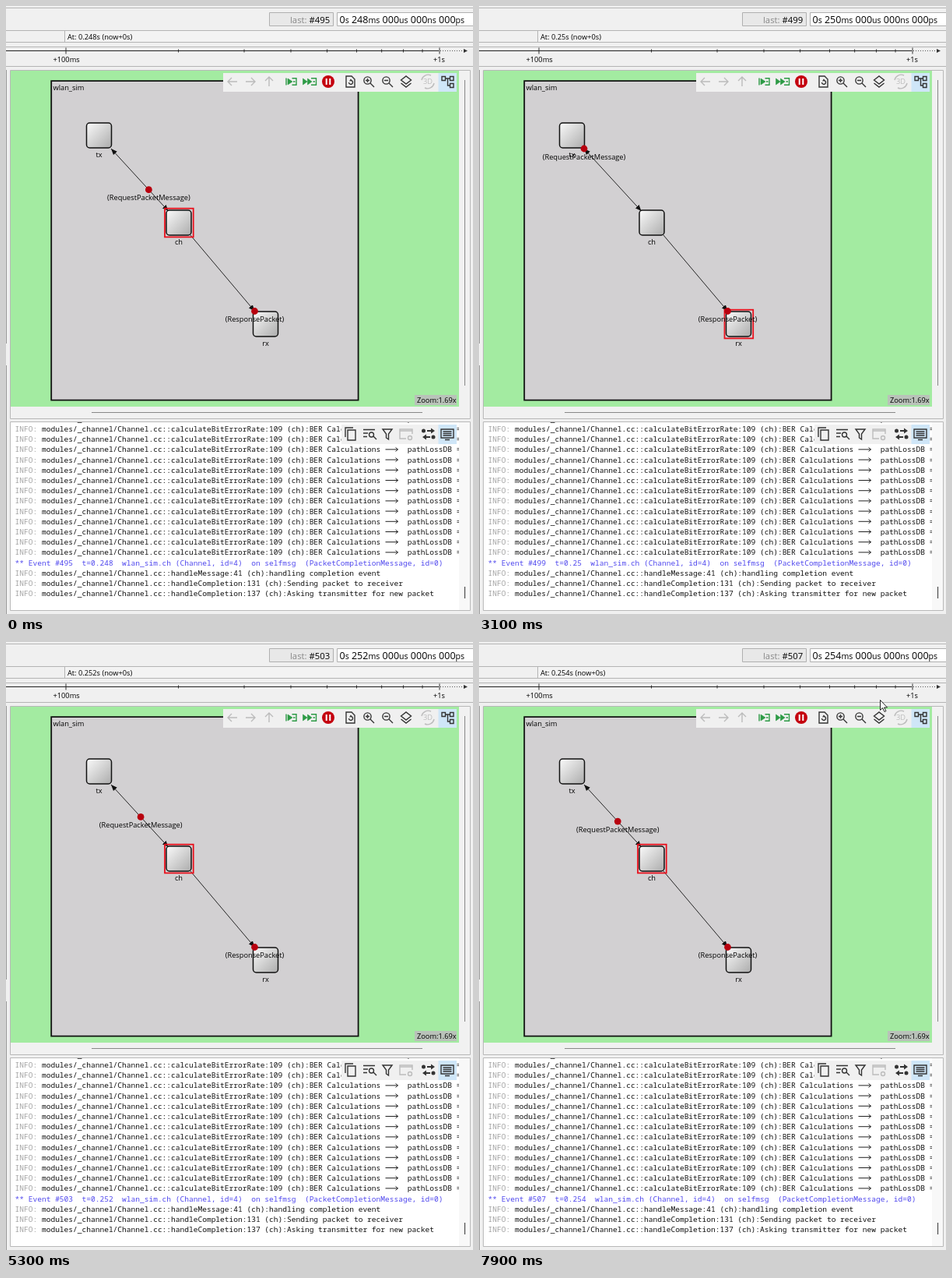
Animation, 600 px wide and 780 px high, one loop 8 s. Source, as an HTML page:

```html
<!DOCTYPE html>
<html lang="en">
<head>
<meta charset="utf-8">
<title>Network simulation</title>
<style>
html, body { margin: 0; width: 100%; height: 100%; overflow: hidden; background: #f0f0f0; }
svg { display: block; }
text { font: 9.25px "Open Sans", "Noto Sans", sans-serif; fill: #000; white-space: pre; }
.log text { font: 9.56px "Noto Sans Mono", "DejaVu Sans Mono", monospace; font-weight: 500; fill: #111; }
.log .info { fill: #a4a4a4; font-weight: 400; }
.log .event { fill: #5048ee; }
.last { font-size: 11.3px; }
.last tspan { fill: #888; }
.clock { font-size: 12.5px; }
.clock tspan { font-size: 10.6px; }
.mid { text-anchor: middle; }
.icon { fill: none; stroke: #333; stroke-width: 1.4; }
.off { stroke: #bcbcbc; }
</style>
</head>
<body>
<svg width="600" height="780" viewBox="0 0 600 780">
  <defs>
    <linearGradient id="metal" x2="1" y2="1">
      <stop stop-color="#fafafa"/><stop offset="1" stop-color="#acacac"/>
    </linearGradient>
    <marker id="tip" markerUnits="userSpaceOnUse" markerWidth="9" markerHeight="8" refX="8" refY="4" orient="auto-start-reverse">
      <path d="M0 .7L8 4L0 7.3z" fill="#111"/>
    </marker>
    <clipPath id="logClip"><path d="M6 534H582V775H6z"/></clipPath>
  </defs>

  <!-- status rows and timeline -->
  <path d="M0 2.5H600M0 31.5H600M0 46.5H600M75.5 31V46M0 52.5H600M0 77.5H600" stroke="#b4b4b4" fill="none"/>
  <path d="M76 32H600V46H76z" fill="#f3f3f3"/>
  <path d="M338.5 8.5H420.5V25.5H338.5z" fill="#e8e8e8" stroke="#b0b0b0"/>
  <path d="M425.5 8.5H602V25.5H425.5z" fill="#fff" stroke="#b0b0b0"/>
  <path id="ticks" fill="none" stroke="#333"/>
  <path d="M0 57.5H556" stroke="#222"/>
  <path d="M558 57.5H588" stroke="#555" stroke-dasharray="1 2"/>
  <path d="M588 55L593 57.5L588 60z" fill="#333"/>
  <text x="60.5" y="71.7">+100ms</text><text x="549" y="71.7">+1s</text>

  <!-- network canvas -->
  <path d="M0.5 82V433M0.5 461V780" stroke="#999"/>
  <path d="M5.5 82.5H596.5V529.5H5.5z" fill="#f1f1f1" stroke="#b8b8b8"/>
  <path d="M6 83H582V514H6z" fill="#a3eba1"/>
  <path d="M58.2 96.2H452.6V505.6H58.2z" fill="#d2d0d2" stroke="#111" stroke-width="1.8"/>
  <path d="M589.5 95V487M110 521.5H535" stroke="#888"/>
  <text x="60.5" y="108">wlan_sim</text>
  <path d="M525 499H579V512H525z" fill="#b9c2b9"/>
  <text x="528" y="508.700">Zoom:1.69x</text>
  <g id="net"></g>
  <g id="live"></g>

  <!-- canvas toolbar -->
  <path d="M279 86H579V110H279z" fill="#f0f0f0"/>
  <path d="M555.5 86H579V110H555.5z" fill="#cfe6f8"/>
  <g class="icon">
    <path class="off" d="M297 97H285m5-5l-5 5l5 5M308 97h12m-5-5l5 5l-5 5M338 103V91m-5 5l5-5l5 5"/>
    <g stroke="#2c9a45">
      <path d="M360 92.500V101.500M367.500 92.700h5.500v8.600h-5.500M369 97h2.500M392 92.700h6.500v8.600H392M394.500 97h2.500"/>
      <path d="M362 93L368 97L362 101zM381.500 93L387 97L381.500 101zM387.500 93L393 97L387.500 101z" fill="#2c9a45" stroke-width=".6"/>
    </g>
    <path d="M437 90h7l4 4v10h-11zM440.500 98a2.500 2.500 0 1 0 2-2.500l1-1.500"/>
    <circle cx="464.500" cy="95.500" r="4.600"/><path d="M468 99l5 5M462 95.500h5M464.500 93v5"/>
    <circle cx="488.500" cy="95.500" r="4.600"/><path d="M492 99l5 5M486 95.500h5"/>
    <path d="M507.500 95L514 90L520.500 95L514 100zM507.500 99L514 104L520.500 99"/>
    <path class="off" d="M534 95a8.500 8.500 0 0 1 12-6M550 99a8.500 8.500 0 0 1-12 6"/>
    <path d="M560 90.500h4.500v5H560zM570.500 90.500H575v5h-4.500zM570.500 99.500H575v5h-4.500zM564.500 93h6M567.500 93v9h3"/>
  </g>
  <text class="mid" x="542" y="100" style="fill:#bcbcbc">3D</text>
  <circle cx="414" cy="97" r="8" fill="#c4000f"/>
  <path d="M411.700 93V101M416.300 93V101" stroke="#fff" stroke-width="2"/>

  <!-- log -->
  <path d="M5.5 533.5H596.5V775.5H5.5z" fill="#fff" stroke="#b8b8b8"/>
  <path d="M582 534H596V775H582z" fill="#f8f8f8"/>
  <path d="M589.5 745V760" stroke="#555" stroke-width="1.300"/>
  <g id="log" class="log" clip-path="url(#logClip)"></g>
  <path d="M431 537H579V562H431z" fill="#f0f0f0"/>
  <path d="M555.5 537H579V562H555.5z" fill="#cfe6f8"/>
  <g class="icon">
    <path d="M439 544h10v13h-10zM436 553V541h10"/>
    <path d="M459 543.500h15M459 548h6M459 552.500h5M472 552l4 4"/><circle cx="469.500" cy="550" r="3"/>
    <path d="M484 543h12l-4.500 6v7l-3-2v-5z"/>
    <path class="off" d="M514 555h-8V543h16v6M506 545h16"/><circle class="off" cx="519" cy="554" r="2.500"/>
    <path d="M559 543h16v11h-16zM561.500 546h11M561.500 548.500h11M561.500 551h11M564 556.500h6"/>
    <g fill="#333" stroke="none">
      <circle cx="536.500" cy="545" r="2.500"/><circle cx="549" cy="553" r="2.500"/>
      <path d="M541 544h5v-2.500l5 3.500l-5 3.500V546h-5zM545 552h-5v-2.500l-5 3.500l5 3.500V554h5z"/>
    </g>
  </g>
  <path id="cursor" d="M0 0V13L3 10L5.500 15L7.500 14L5 9.500H9z" fill="#fff" stroke="#222"/>
</svg>
<script>
const $ = id => document.getElementById(id);
const LOOP = 8000;
const STARTS = [0, 2608, 5216, 7858];
const ROWS = 18, PITCH = 13.2, LAST_ROW = 757.2, LOG_X = 11.6;
const NODES = { tx: [119.5, 166], ch: [222, 278], rx: [333.5, 408] };
const TX_END = [135, 183], CH_END = [208.5, 263], CH_OUT = [237, 294], RX_END = [319.5, 391.5];
// Moments within one cycle of four events, in ms
const SENT = 396, RX_EVENT = 600, TX_NEXT = 780, TX_EVENT = 954, BACK = 1554,
      CH_EVENT = 1650, COMPUTED = 1740, COMPLETED = 1830, REQUEST = 2404, PERIOD = 2608;

const text = (x, y, s, attrs = "") => `<text x="${x}" y="${y}" ${attrs}>${s}</text>`;
const progress = (u, from, to) => Math.min(1, Math.max(0, (u - from) / (to - from)));
const mix = (a, b, p) => a.map((v, i) => v + (b[i] - v) * p);

$("ticks").setAttribute("d", [1, 2, 3, 4, 5, 6, 7, 8, 9, 10].map(k => {
  const size = k % 9 === 1 ? 4 : 2;
  return `M${77 + 480 * Math.log10(k)} ${57.5 - size}v${2 * size}`;
}).join(""));

const wire = (a, b, attrs) =>
  `<path d="M${a}L${b}" stroke="#111" stroke-width=".9" marker-end="url(#tip)" ${attrs}/>`;
$("net").innerHTML = wire(TX_END, CH_END, 'marker-start="url(#tip)"') + wire(CH_OUT, RX_END, "") +
  Object.entries(NODES).map(([name, [x, y]]) =>
    `<rect x="${x - 16}" y="${y - 16}" width="32" height="32" rx="4" fill="url(#metal)" stroke="#111" stroke-width="1.5"/>` +
    text(x, y + 28, name, 'class="mid"')).join("");

const message = ([x, y], name) =>
  `<circle cx="${x}" cy="${y}" r="4.4" fill="#b8000f"/>` + text(x, y + 13.5, `(${name})`, 'class="mid"');

function logLines(cycle, u) {
  const time = +(0.248 + 0.002 * cycle).toFixed(3);
  const first = 495 + 4 * cycle, id = 248 + 2 * cycle;
  const event = (n, target, cause) => `** Event #${first + n}  t=${time}  wlan_sim.${target}  on ${cause}`;
  const channel = s => `INFO: modules/_channel/Channel.cc::${s}`;
  const ber = Array(ROWS).fill(channel("calculateBitErrorRate:109 (ch):BER Calculations --&gt;  pathLossDB ="));
  if (u >= COMPUTED) return ber;
  const lines = [...ber,
    event(0, "ch (Channel, id=4)", "selfmsg  (PacketCompletionMessage, id=0)"),
    channel("handleMessage:41 (ch):handling completion event"),
    channel("handleCompletion:131 (ch):Sending packet to receiver"),
    channel("handleCompletion:137 (ch):Asking transmitter for new packet")];
  if (u >= RX_EVENT) lines.push(
    event(1, "rx (Receiver, id=3)", ` (ResponsePacket, id=${id})`),
    `INFO: modules/receiver/Receiver.cc::handleMessage:16 (rx):got valid message, sequenceNumber = ${123 + cycle}, last`);
  if (u >= TX_EVENT) lines.push(
    event(2, "tx (Transmitter, id=2)", ` (RequestPacketMessage, id=${id + 1})`),
    `INFO: modules/transmitter/Transmitter.cc::handleMessage:17 (tx):generating a new packet at time ${time}`);
  if (u >= CH_EVENT) lines.push(event(3, "ch (Channel, id=4)", ` (ResponsePacket, id=${id + 2})`));
  return lines.slice(-ROWS);
}

function logRow(line, i) {
  const y = LAST_ROW - PITCH * (ROWS - 1 - i);
  if (line[0] === "*") return text(LOG_X, y, line, 'class="event"');
  const arrow = line.includes("--&gt;")
    ? `<path d="M487.5 ${y - 3.5}h16m-3 -2.5l3 2.5l-3 2.5" fill="none" stroke="#222"/>` : "";
  return text(LOG_X, y, line.replace("INFO:", '<tspan class="info">INFO:</tspan>').replace("--&gt;", "   ")) + arrow;
}

function status(cycle, u) {
  const ms = 248 + 2 * cycle;
  const done = [RX_EVENT, TX_EVENT, CH_EVENT].filter(m => u >= m).length;
  const now = ms / 1000;
  const at = u < CH_EVENT ? `${now}s (now+0s)`
    : u < COMPUTED ? `100s (now+${+(100 - now).toFixed(3)}s)`
    : `${(ms + 2) / 1000}s (now+0.002s)`;
  const clock = [[0, "s"], [ms, "ms"], ["000", "us"], ["000", "ns"], ["000", "ps"]]
    .map(([n, unit]) => `${n}<tspan>${unit}</tspan>`).join(" ");
  return text(365, 21.5, `<tspan>last:</tspan> #${495 + 4 * cycle + done}`, 'class="last"') +
    text(428.5, 21.7, clock, 'class="clock"') + text(79, 42.5, `At: ${at}`);
}

function messages(u) {
  const list = [];
  if (u < RX_EVENT)
    list.push(message(mix(CH_OUT, RX_END, progress(u, COMPLETED - PERIOD, REQUEST - PERIOD)), "ResponsePacket"));
  if (u < TX_EVENT && u >= REQUEST - PERIOD)
    list.push(message(mix(CH_END, TX_END, progress(u, REQUEST - PERIOD, SENT)), "RequestPacketMessage"));
  if (u >= TX_EVENT && u < COMPUTED)
    list.push(message(mix(TX_END, CH_END, progress(u, TX_EVENT, BACK)), "ResponsePacket"));
  return list.join("");
}

function draw(t) {
  // A cycle opens with the completion event, shortly before its start mark
  let cycle = STARTS.length - 1;
  while (cycle && t < STARTS[cycle] + COMPLETED - PERIOD) cycle--;
  const u = t - STARTS[cycle];
  const active = u < SENT || u >= BACK ? "ch" : u < TX_NEXT ? "rx" : "tx";
  const [x, y] = NODES[active];
  $("live").innerHTML = status(cycle, u) +
    `<rect x="${x - 18}" y="${y - 18.3}" width="36.7" height="36.7" fill="none" stroke="#e8101c" stroke-width="1.8"/>` +
    messages(u);
  $("log").innerHTML = logLines(cycle, u).map(logRow).join("");
  const [cx, cy] = mix([560, 18], [515.5, 74.5], progress(t, 7600, 7900));
  $("cursor").setAttribute("transform", `translate(${cx} ${cy})`);
  $("cursor").style.display = t < 7600 ? "none" : "";
}

const began = performance.now();
function tick() {
  draw((performance.now() - began) % LOOP);
  requestAnimationFrame(tick);
}
tick();
</script>
</body>
</html>
```
